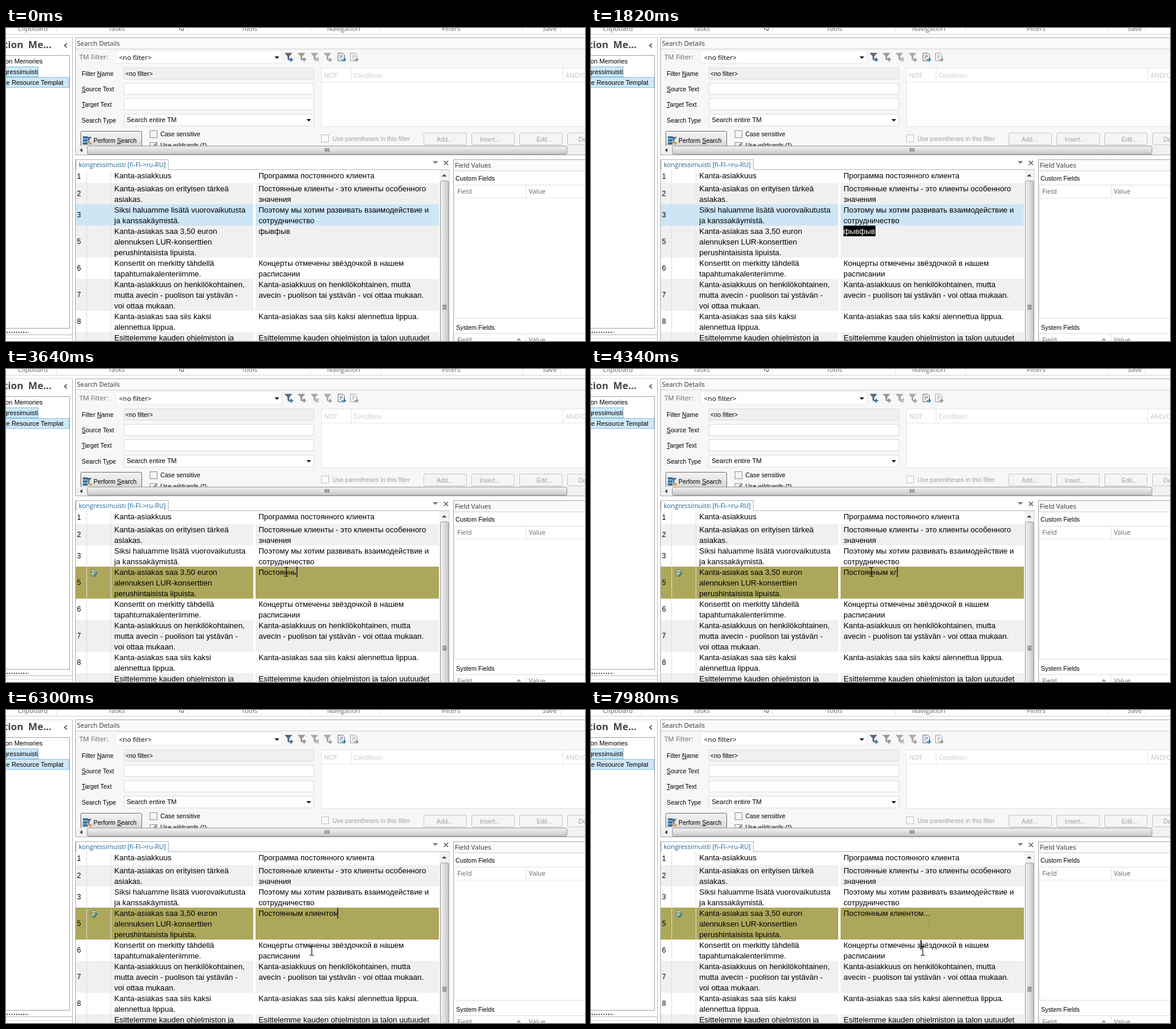
An HTML page that plays this animation: 979x529 px, repeating every 8 s.

```html
<!DOCTYPE html>
<html lang="en">
<head>
<meta charset="utf-8">
<title>Translation memory editor</title>
<style>
html, body { margin: 0; width: 100%; height: 100%; overflow: hidden; background: #fff; }
svg { position: fixed; left: 0; top: 0; display: block; }
text { white-space: pre; fill: #000; }
.ui { font: 11px "Open Sans", "Noto Sans", sans-serif; fill: #333; }
.form { font: 10.4px "Liberation Sans", Arial, sans-serif; }
.lat { font: 13.1px "Liberation Sans", Arial, sans-serif; }
.cyr { font: 12.9px "Liberation Sans", Arial, sans-serif; }
.num { font: 12px "Liberation Sans", Arial, sans-serif; }
.off { fill: #a0a0a0; }
.faint { fill: #c4c4c4; }
.dim { fill: #666; }
.big { font: bold 16.5px "Open Sans", "Noto Sans", sans-serif; fill: #444; word-spacing: 4px; }
.u { text-decoration: underline; }
</style>
</head>
<body>
<svg id="stage" width="979" height="529" viewBox="0 0 979 529"></svg>
<script>
const LOOP = 8000;
const stage = document.getElementById('stage');

const rect = (x, y, w, h, fill, stroke = 'none', extra = '') => stroke === 'none'
  ? `<rect x="${x}" y="${y}" width="${w}" height="${h}" fill="${fill}" ${extra}/>`
  : `<rect x="${x + .5}" y="${y + .5}" width="${w - 1}" height="${h - 1}" fill="${fill}" stroke="${stroke}" ${extra}/>`;
const hline = (x, y, w, color) => rect(x, y, w, 1, color);
const vline = (x, y, h, color) => rect(x, y, 1, h, color);
const path = (d, fill, stroke = 'none', width = 1, extra = '') =>
  `<path d="${d}" fill="${fill}" stroke="${stroke}" stroke-width="${width}" ${extra}/>`;
// An underscore marks the letter to underline.
const text = (x, y, s, cls = 'ui', extra = '') => {
  const safe = s.replace(/</g, '&lt;').replace(/_(.)/g, '<tspan class="u">$1</tspan>');
  return `<text x="${x}" y="${y}" class="${cls}" ${extra}>${safe}</text>`;
};
const down = (x, y, r = 4, color = '#111') => path(`M${x - r} ${y}h${2 * r}l${-r} ${r}z`, color);

function ribbon() {
  const labels = [[20, 'Clipboard'], [173, 'Tasks'], [398, 'Tools'], [543, 'Navigation'], [737, 'Filters'], [907, 'Save']];
  return labels.map(([x, s]) => text(x, 5, s, 'ui dim', 'style="font-size:11.2px"')).join('')
    + [85, 306, 514, 633, 873, 937].map(x => vline(x, 0, 9, '#e2e2e2')).join('')
    + path('M293.500 0v4M295 1l4 3M300 0v4h-4', 'none', '#555')
    + hline(0, 10, 979, '#d0d0d0');
}

function sidebar() {
  return text(77, 34, 'Translation Me...', 'big', 'text-anchor="end"')
    + path('M103 26l-4 3.500l4 3.500', 'none', '#333', 1.4)
    + hline(0, 16, 113, '#d4d4d4') + vline(112, 16, 513, '#b4b4b4')
    + hline(0, 46, 108, '#a0a0a0') + vline(107, 46, 462, '#a0a0a0') + hline(0, 507, 108, '#a0a0a0')
    + rect(-2, 65, 57, 18, '#cce8f8', '#86bdd8')
    + rect(-2, 83, 109, 18, '#cfe8f6', '#8fc3df')
    + [[62, 60, 'Translation Memories'], [54, 78, 'kongressimuisti'], [97, 96, 'Language Resource Templat']]
      .map(([x, y, s]) => text(x, y, s, 'form', 'text-anchor="end" style="font-size:10.9px"')).join('')
    + path('M1 514.500h37', 'none', '#444', 2, 'stroke-dasharray="2 2"')
    + hline(0, 518, 112, '#b4b4b4') + hline(0, 524, 112, '#d8d8d8');
}

const funnel = (x, color, badge, badgeColor) =>
  path(`M${x - 7} 42h13l-5 6v7l-3 -2v-5z`, color)
  + path(badge === '+' ? `M${x + 4} 50v7M${x + .5} 53.500h7`
    : badge === 'x' ? `M${x + 1} 50l6 6m0 -6l-6 6`
    : badge === '^' ? `M${x + 4} 57v-6m-3 3l3 -3l3 3`
    : `M${x + 4} 50v6m-3 -3l3 3l3 -3`, 'none', badgeColor, 1.8);

const sheet = (x, color, arrow) =>
  path(`M${x - 5.5} 42.500h8l3 3v10h-11z`, '#fff', color)
  + path(`M${x - 3} 46h6M${x - 3} 48.500h6M${x - 3} 51h3`, 'none', color)
  + path(`M${x} 53.500h7m-3 -3l3 3l-3 3`, 'none', arrow, 1.6);

function searchPane() {
  const labels = [[81, 'Filter _Name'], [107, '_Source Text'], [133, '_Target Text'], [160, 'Search Type']];
  const buttons = [[706, 22, 'Add...'], [787, 14, 'Insert...'], [868, 29, 'Edit...'], [949, 19, 'Delete']];
  const border = '#d9dce0';
  return rect(118, 36, 861, 163, '#f7f7f7')
    + vline(117, 16, 199, '#a8a8a8') + hline(117, 16, 862, '#a8a8a8')
    + rect(118, 17, 861, 18, '#fafafa') + hline(118, 35, 861, '#d0d0d0')
    + text(120, 30, 'Search Details')
    + text(124, 53, 'TM Filter:', 'ui dim', 'style="font-size:11.3px"')
    + rect(185, 38, 282, 22, '#fff', '#e8e8e8')
    + text(191, 54, '<no filter>', 'ui', 'style="font-size:11.5px;fill:#000"') + down(458, 48)
    + funnel(478, '#596980', '+', '#1e6795') + funnel(500, '#999', '^', '#888')
    + funnel(522, '#aaa', 'x', '#aaa') + funnel(544, '#aaa', 'v', '#999')
    + sheet(567, '#56687d', '#21749f') + sheet(588, '#999', '#888')
    + labels.map(([y, s]) => text(128, y, s, 'form')).join('')
    + rect(199, 67, 322, 20, '#f0f0f0', border) + text(202, 81, '<no filter>', 'form')
    + rect(199, 93, 322, 20, '#fff', border) + rect(199, 119, 322, 20, '#fff', border)
    + rect(199, 145, 322, 21, '#fff', border)
    + text(204, 159, 'Search entire TM', 'form', 'style="font-size:11.05px"') + down(512, 154)
    + rect(533, 67, 450, 100, '#fff', '#e4e4e4') + hline(534, 91, 445, '#e8e8e8')
    + vline(583, 68, 24, '#e4e4e4') + vline(941, 68, 24, '#e4e4e4')
    + text(538, 84, 'NOT', 'ui faint') + text(588, 84, 'Condition', 'ui faint', 'style="font-size:10.5px"')
    + text(946, 84, 'AND/OR', 'ui faint')
    + rect(126, 174, 104, 30, 'url(#button)', '#707070', 'rx="2"')
    + rect(130, 183, 8, 4, '#35729c') + rect(130, 188, 8, 4, '#35729c') + rect(130, 193, 8, 4, '#35729c')
    + path('M135 184h10l-4 5v7l-2 -2v-5z', '#56708c') + path('M140 193h5v4h-5z', '#e0a33c')
    + text(148, 194, 'Perform _Search', 'form')
    + rect(243, 173, 13, 13, '#f4f4f4', '#8e8f8f') + text(261, 183, 'Case sensitive', 'form')
    + rect(243, 193, 13, 13, '#f4f4f4', '#8e8f8f') + path('M246 199l3 3l5 -7', 'none', '#334477', 1.6)
    + text(261, 202, 'Use wildcards (*)', 'form')
    + rect(533, 180, 13, 13, '#fafafa', '#c0c0c0') + text(552, 191, 'Use parentheses in this filter', 'form off')
    + buttons.map(([x, dx, s]) => rect(x, 177, 73, 21, '#f5f5f5', '#c0c4c7', 'rx="2"')
      + text(x + dx, 192, s, 'form off')).join('')
    + rect(118, 199, 861, 15, '#f1f1f1') + path('M129 203v7l-4 -3.500z', '#333')
    + rect(137, 199, 812, 15, 'url(#thumbH)', '#989898', 'rx="2"')
    + [539, 542, 545].map(x => rect(x, 203, 1.5, 6, '#666')).join('')
    + hline(117, 214, 862, '#a8a8a8');
}

const rows = [
  [1, 240, ['Kanta-asiakkuus'], ['Программа постоянного клиента']],
  [2, 262, ['Kanta-asiakas on erityisen tärkeä', 'asiakas.'], ['Постоянные клиенты - это клиенты особенного', 'значения']],
  [3, 298, ['Siksi haluamme lisätä vuorovaikutusta', 'ja kanssakäymistä.'], ['Поэтому мы хотим развивать взаимодействие и', 'сотрудничество']],
  [5, 334, ['Kanta-asiakas saa 3,50 euron', 'alennuksen LUR-konserttien', 'perushintaisista lipuista.'], []],
  [6, 388, ['Konsertit on merkitty tähdellä', 'tapahtumakalenteriimme.'], ['Концерты отмечены звёздочкой в нашем', 'расписании']],
  [7, 424, ['Kanta-asiakkuus on henkilökohtainen,', 'mutta avecin - puolison tai ystävän -', 'voi ottaa mukaan.'], ['Kanta-asiakkuus on henkilökohtainen, mutta', 'avecin - puolison tai ystävän - voi ottaa mukaan.']],
  [8, 478, ['Kanta-asiakas saa siis kaksi', 'alennettua lippua.'], ['Kanta-asiakas saa siis kaksi alennettua lippua.']],
  [9, 514, ['Esittelemme kauden ohjelmiston ja'], ['Esittelemme kauden ohjelmiston ja talon uutuudet']]
];

function tableRow([number, y, source, target], i) {
  const height = i ? 18 * source.length : 22;
  const lines = (x, list) => list.map((s, k) =>
    text(x, y + 14 + 18 * k, s, /[а-я]/.test(s) ? 'cyr' : 'lat')).join('');
  return rect(118, y, 614, height, i % 2 ? '#f0f0f0' : '#fff', 'none', `id="row${number}"`)
    + (number < 9 ? text(120, y + height / 2 + 4, String(number), 'num') : '')
    + lines(183, source) + lines(427, target);
}

function editorPane() {
  return vline(117, 222, 307, '#a8a8a8') + hline(117, 239, 633, '#b8b8b8')
    + rect(118, 222, 157, 18, '#fff', '#a8b4bc') + hline(119, 239, 155, '#fff')
    + text(123, 235, 'kongressimuisti [fi-FI->ru-RU]', 'ui', 'style="fill:#1b6493;font-size:10.9px"')
    + down(726, 225, 4.5, '#777') + path('M740.500 224.500l7 7m0 -7l-7 7', 'none', '#666', 1.7)
    + rows.map(tableRow).join('')
    + vline(136, 240, 289, '#dedede') + vline(177, 240, 289, '#dedede')
    + rect(418, 240, 4, 289, '#fff')
    + rect(733, 240, 17, 289, '#f2f2f2') + path('M737 251h8l-4 -4z', '#444')
    + rect(734, 258, 15, 280, 'url(#thumbV)', '#9a9a9a', 'rx="2"')
    + [468, 471, 474].map(y => rect(738, y, 7, 1.5, '#666')).join('')
    + vline(749, 240, 289, '#d8d8d8');
}

function fieldPane() {
  const header = (y, h) => rect(758, y, 230, h, '#fff', '#dcdcdc') + vline(879, y, 22, '#e2e2e2')
    + text(763, y + 15, 'Field', 'ui dim', 'style="font-size:11.2px"')
    + text(884, y + 15, 'Value', 'ui dim');
  return vline(756, 222, 307, '#a8a8a8') + hline(756, 222, 223, '#a8a8a8')
    + rect(757, 223, 222, 18, '#fafafa') + hline(757, 241, 222, '#d0d0d0')
    + text(759, 236, 'Field Values', 'ui', 'style="font-size:11.2px"')
    + text(760, 258, 'Custom Fields', 'form') + header(265, 226) + hline(759, 287, 220, '#e8e8e8')
    + text(761, 510, 'System Fields', 'form') + header(516, 40)
    + path('M863 528h8l-4 -4z', '#999');
}

const gradient = (id, vertical, a, b, c) => `<linearGradient id="${id}" x2="${vertical ? 0 : 1}" y2="${vertical ? 1 : 0}">`
  + `<stop stop-color="${a}"/><stop offset=".5" stop-color="${b}"/><stop offset="1" stop-color="${c}"/></linearGradient>`;

stage.innerHTML = '<defs>' + gradient('button', true, '#f3f3f3', '#e6e6e6', '#cfcfcf')
  + gradient('thumbH', true, '#f0f0f0', '#dedede', '#c4c4c4')
  + gradient('thumbV', false, '#f0f0f0', '#dedede', '#c4c4c4') + '</defs>'
  + rect(0, 0, 979, 529, '#fff') + ribbon() + sidebar() + searchPane() + editorPane() + fieldPane()
  + `<g id="editIcon">${path('M144 341v8q4 3 8 1v-9', '#bdbc87', '#467c87')}
    <ellipse cx="148" cy="341" rx="4.500" ry="2" fill="#d1d0a3" stroke="#467c87"/>
    ${path('M148 350l6 -6', 'none', '#2c7890', 2.4)}</g>`
  + rect(427, 334, 0, 18, '#000', 'none', 'id="selection"')
  + text(427, 348, '', 'cyr', 'id="typed"')
  + '<clipPath id="selected"><rect id="selectedBox" x="427" y="334" width="0" height="18"/></clipPath>'
  + text(427, 348, 'фывфыв', 'cyr', 'id="inverse" style="fill:#fff" clip-path="url(#selected)"')
  + rect(0, 334, 2, 18, '#34397c', 'none', 'id="caret"')
  + `<g id="trail">${rect(571, 354, 1, 17, '#99966f')}</g>`
  + `<g id="smear">${rect(557, 389, 2, 16, '#222')}</g>`
  + `<g id="beam">${path('M-3.500 -7.500h2.500l1 1l1 -1h2.500M0 -6.500v13M-3.500 7.500h2.500l1 -1l1 1h2.500', 'none', '#111', 1.2)}</g>`
  + `<g id="arrow">${path('M.5 .5v16l4 -4l2.500 6l2.500 -1l-2.500 -6h5z', '#fff', '#111')}</g>`;

const el = {};
stage.querySelectorAll('[id]').forEach(node => el[node.id] = node);
const show = (node, on) => node.setAttribute('visibility', on ? 'visible' : 'hidden');

const phrase = 'Постоянным клиентом...';
// [time, letters typed]
const keys = [[2380, 1], [2520, 2], [2800, 4], [3080, 6], [3360, 7], [3500, 8], [3640, 9], [3780, 10],
  [3920, 11], [4200, 12], [4340, 13], [4620, 14], [4900, 15], [5040, 16], [5180, 17], [5320, 18],
  [5600, 19], [6580, 20], [6720, 22]];
const selecting = [[0, 0], [1400, 2], [1680, 4], [1820, 6], [2380, 0]];
// [time, x, y]; a missing position hides the pointer
const pointer = [[0], [280, 862, 508], [420, 790, 420], [560, 690, 330], [700, 590, 275], [840, 510, 256],
  [980, 456, 290], [1120, 452, 338], [1260, 474, 343], [1400], [2380, 474, 343], [6300, 517, 407],
  [6580, 526, 407], [6720, 537, 407], [7280, 543, 402], [7420, 556, 384], [7560, 569, 362],
  [7700, 569, 362], [7840, 558, 397], [7980, 561, 407]];
const at = (steps, t) => steps.filter(step => step[0] <= t).pop();

function render(t) {
  const editing = t >= 2380;
  el.row3.setAttribute('fill', editing ? '#fff' : '#cce6f5');
  el.row5.setAttribute('fill', editing ? '#ada75b' : '#f0f0f0');
  show(el.editIcon, editing);

  el.typed.textContent = editing ? phrase.slice(0, at(keys, t)[1]) : 'фывфыв';
  const end = 427 + el.typed.getComputedTextLength();
  el.caret.setAttribute('x', Math.round(end) - 2);
  show(el.caret, editing && !(t >= 6020 && t < 6300) && t < 7280);

  const count = at(selecting, t)[1];
  const width = count ? Math.ceil(el.inverse.getSubStringLength(0, count)) : 0;
  el.selection.setAttribute('width', width);
  el.selectedBox.setAttribute('width', width);

  const [, x, y] = at(pointer, t);
  const overText = x < 732;
  show(el.beam, x !== undefined && overText);
  show(el.arrow, x !== undefined && !overText);
  if (x !== undefined) (overText ? el.beam : el.arrow).setAttribute('transform', `translate(${x} ${y})`);
  show(el.trail, t >= 7840);
  show(el.smear, t >= 7980);
}

const start = performance.now();
function tick(now) {
  render(Math.max(0, now - start) % LOOP);
  requestAnimationFrame(tick);
}
render(0);
requestAnimationFrame(tick);
</script>
</body>
</html>
```
